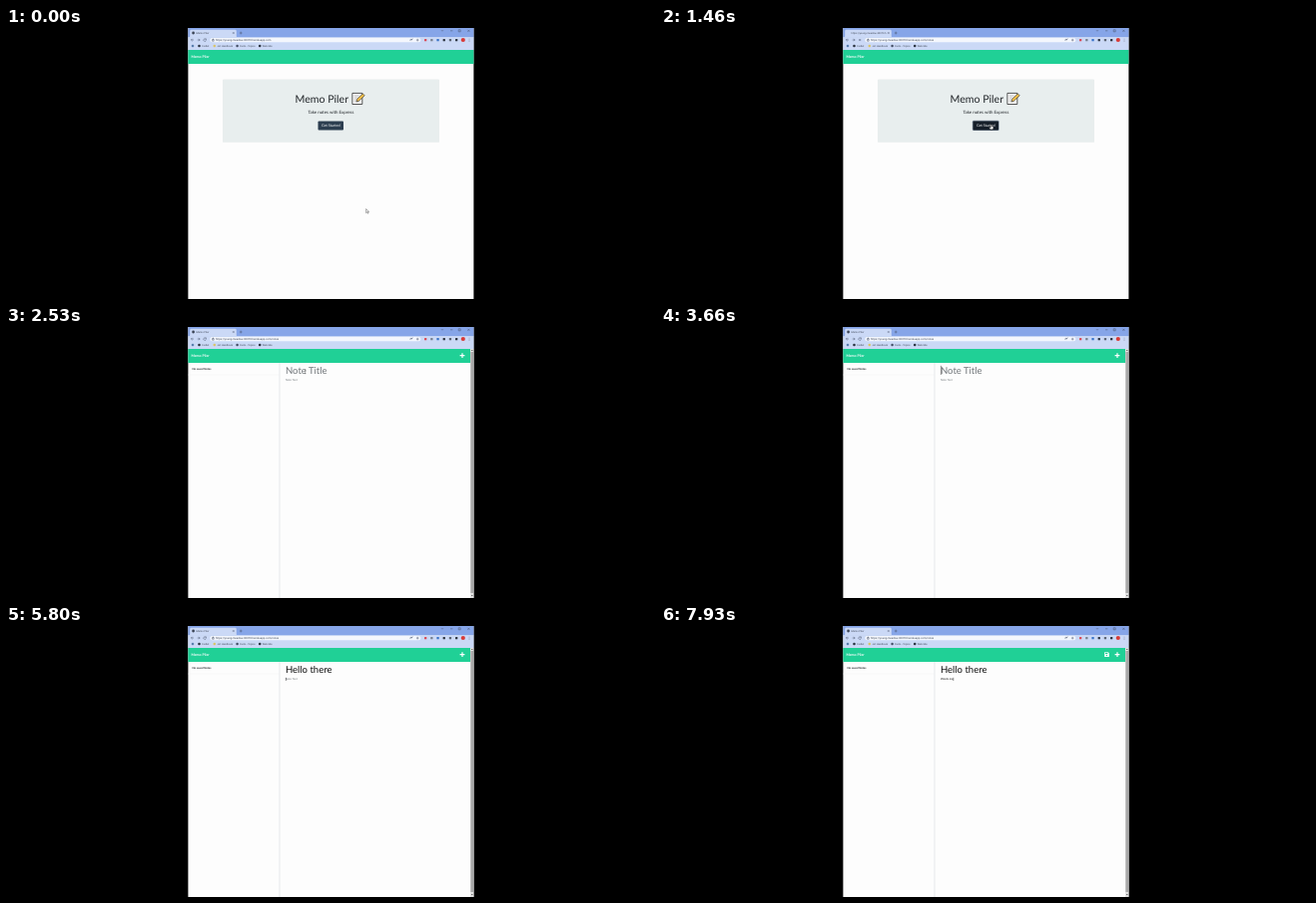
Recreate the animation shown at these times as an HTML page. Size 650 px wide and 272 px high, loop 8 s.

```html
<!DOCTYPE html>
<html lang="en">
<head>
<meta charset="utf-8">
<title>Memo Piler</title>
<style>
  html, body { margin: 0; width: 100%; height: 100%; overflow: hidden; background: #000; }
  svg { display: block; width: 100%; height: 100%; }
  text { white-space: pre; text-rendering: geometricPrecision; font-family: Lato, sans-serif; }
  .ui text { font: 2.5px Roboto, sans-serif; fill: #3c4453; }
  .ui .url { font-size: 2.72px; }
  .icon { fill: none; stroke: #465168; stroke-width: .5; }
</style>
</head>
<body>
<svg viewBox="0 0 650 272">
  <rect width="650" height="272" fill="#000"/>
  <rect x="182.4" width="286" height="272" fill="#fdfdfd"/>

  <g class="ui">
    <rect x="182.4" width="286" height="9.6" fill="#86a5e8"/>
    <rect x="182.4" y="9.2" width="286" height="12.8" fill="#cbd9f6"/>
    <path d="M183 9.4q1.2 0 1.2-1.2V3.2q0-1.4 1.4-1.4H229.4q1.4 0 1.4 1.4V8.2q0 1.2 1.2 1.2z" fill="#cbd9f6"/>
    <circle id="favicon" cx="187.6" cy="5" r="1.4" fill="#3d4656"/>
    <text id="tab" x="190.6" y="5.9"></text>
    <path class="icon" d="M227 4.2l1.6 1.6m0-1.6l-1.6 1.6M233.8 5h2.8m-1.4-1.4v2.8"/>
    <path class="icon" d="M436 2.2l1 1 1-1M445 2.8h2.4M453.2 1.8h2v2h-2zM462.4 1.8l2 2m0-2l-2 2"/>
    <path class="icon" d="M188 12H185.4m1.2-1.2l-1.2 1.2 1.2 1.2M191.6 12h2.6m-1.2-1.2l1.2 1.2-1.2 1.2"/>
    <path id="reload" class="icon"/>
    <rect x="204.4" y="9.9" width="211" height="4.4" rx="2.2" fill="#f4f7fd"/>
    <path class="icon" d="M206.6 11.7h1.6v1.5h-1.6zM207 11.6v-.6h.8v.6M405 13v-1.6h2M406 12.2l1.6-1.4M410.9 12.1h2.6m-1.3-1.3v2.6"/>
    <text id="url" class="url" x="210" y="13"></text>
    <g id="tools"></g>
    <g id="marks"></g>
  </g>

  <rect id="bar" x="182.4" y="22" height="14" fill="#20d096"/>
  <text x="185.4" y="30.1" font-size="3.55" font-weight="700" fill="#fff">Memo Piler</text>

  <g id="home">
    <rect x="217" y="51.6" width="217" height="63.2" rx=".9" fill="#e8eeee"/>
    <text x="343" y="74.7" font-size="10.6" text-anchor="end" fill="#212529">Memo Piler</text>
    <g stroke="#2b2b2b" stroke-width=".8">
      <path d="M346.9 65.4H356.8V76.5H346.9z" fill="#fff"/>
      <path d="M348.6 68h5m-5 2h3.6m-3.6 2h2.4m-2.4 2h5.6" stroke="#777" stroke-width=".5"/>
      <path d="M351 74l.8-2.9 5.6-5.2 1.8 1.9-5.5 5.2z" fill="#f3c04b" stroke-width=".6"/>
    </g>
    <text x="325.4" y="86.1" font-size="4.4" text-anchor="middle" fill="#212529">Take notes with Express</text>
    <rect id="ring" x="311.8" y="92.8" width="26.9" height="10.3" rx="1.4" fill="#8390a0"/>
    <rect id="button" x="312.5" y="93.5" width="25.5" height="9" rx=".9"/>
    <text x="325.3" y="99.2" font-size="3.7" text-anchor="middle" fill="#fff">Get Started</text>
  </g>

  <g id="notes">
    <rect x="465" y="22" width="3.4" height="250" fill="#e4e4e4"/>
    <rect x="465.4" y="25" width="2.6" height="242" fill="#aaa"/>
    <path d="M465.8 24l1-1.2 1 1.2zM465.8 269l1 1.2 1-1.2z" fill="#555"/>
    <path d="M274 36V272" stroke="#dcdfe2" stroke-width=".7"/>
    <path d="M182.4 48H274" stroke="#eceeef" stroke-width=".5"/>
    <text x="186.5" y="43" font-size="2.7" font-weight="700" fill="#212529">No saved Notes</text>
    <path d="M454.6 28.6h4.8m-2.4-2.4v4.8" stroke="#fff" stroke-width="1.2"/>
    <g id="save">
      <path d="M444.2 26.2h3.6l1 1v3.8h-4.6z" fill="#fff"/>
      <path d="M445 26.9h2.4v1.1H445z" fill="#20d096"/>
      <circle cx="446.4" cy="29.5" r=".7" fill="#20d096"/>
    </g>
    <text id="title" x="280" y="46.7" font-size="9.5"></text>
    <text id="body" x="280" y="54.4" font-size="2.75"></text>
    <path id="caret" stroke="#222" stroke-width=".5"/>
  </g>

  <g id="mouse">
    <path id="arrow" d="M0 0V4l1-.9 .7 1.5 .7-.3-.7-1.5H3z" fill="#fff" stroke="#333" stroke-width=".4"/>
    <path id="hand" d="M-.4 0h.8v1.6l1.8.5v1.7l-.6 1H-.8L-2 2.8l.5-.4 1.1.8z" fill="#fff" stroke="#222" stroke-width=".4"/>
    <path id="beam" d="M-.7 -2h1.4M-.7 2h1.4M0 -2V2" fill="none" stroke="#444" stroke-width=".35"/>
  </g>
</svg>
<script>
const LOOP = 8000, STEP = 1000 / 15, BLINK = 530;
const HOVER = 860, PRESS = 1130, LOADING = 1330, OPEN = 1530;
const FOCUS_TITLE = 2600, FOCUS_BODY = 5800, SAVE = 6400;
const HOST = 'https://young-meadow-30070.herokuapp.com';

const $ = {};
document.querySelectorAll('[id]').forEach(e => $[e.id] = e);
const set = (e, attrs) => { for (const k in attrs) e.setAttribute(k, attrs[k]); };
const show = (e, on) => e.style.display = on ? '' : 'none';
const write = (e, s) => { if (e.textContent !== s) e.textContent = s; };
const clamp = v => Math.max(0, Math.min(1, v));
const ease = v => v * v * (3 - 2 * v);

$.tools.innerHTML = ['#d94b57', '#77808f', '#3973c9', '#2b3340', '#5a6373', '#2b3340']
  .map((c, i) => `<rect x="${419 + i * 6.2}" y="10.9" width="2.3" height="2.3" rx=".5" fill="${c}"/>`)
  .join('') + '<circle cx="457.8" cy="12" r="2.1" fill="#d83a36"/>'
  + '<path d="M464 10.8v.5m0 .6v.5m0 .6v.5" stroke="#444" stroke-width=".5"/>';
$.marks.innerHTML = [[187, '', '#5b7fae'], [193.5, 'Codlet', '#2b3340'], [208.8, 'Jot Handbook', '#d9c46a'],
  [231.6, 'Facts - Topics', '#465168'], [254.2, 'Web-Site', '#2b3340']]
  .map(([x, s, c]) => `<circle cx="${x}" cy="18" r="1.3" fill="${c}"/><text x="${x + 2.6}" y="18.9">${s}</text>`)
  .join('');

const titleKeys = { text: 'Hello there', at: [4530, 4600, 4860, 4930, 5000, 5060, 5130, 5200, 5260, 5400, 5460] };
const bodyKeys = { text: 'Words me', at: [6260, 6800, 6860, 7000, 7060, 7200, 7660, 7860] };

function typed({ text, at }, t, focus) {
  const past = at.filter(k => k <= t);
  return { text: text.slice(0, past.length), last: past.length ? past[past.length - 1] : focus };
}

function field(e, state, placeholder) {
  write(e, state.text || placeholder);
  set(e, { fill: state.text ? '#0c0c0c' : '#6f7478' });
  return 280.4 + (state.text ? e.getComputedTextLength() : 0);
}

function mouse(t) {
  const q = Math.floor((t + 7) / STEP) * STEP;
  const a = ease(clamp(q / 860)), b = ease(clamp((q - 1750) / 880));
  const x = 360.6 - 30 * a - 32 * b, y = 181.6 - 84.6 * a - 54 * b;
  const over = t >= HOVER && t < OPEN, input = t >= OPEN && y < 88;
  set($.mouse, { transform: `translate(${x} ${y})` });
  show($.mouse, t < 2930);
  show($.hand, over);
  show($.beam, input);
  show($.arrow, !over && !input);
}

function draw(t) {
  const open = t >= OPEN, loading = t >= LOADING && !open;
  show($.home, !open);
  show($.notes, open);
  set($.bar, { width: open ? 282.6 : 286 });
  show($.favicon, !loading);
  write($.tab, loading ? 'https://young-meadow-30070.h' : 'Memo Piler');
  write($.url, HOST + (t >= LOADING ? '/notes' : ''));
  set($.reload, { d: loading ? 'M198.2 11l2 2m0-2l-2 2' : 'M200.2 11.3a1.3 1.3 0 1 0 .2 1.1M200.5 10.6v1h-1' });

  const dark = clamp((t - HOVER) / 150);
  const shade = (from, to) => Math.round(from + (to - from) * dark);
  set($.button, { fill: t >= PRESS ? '#151e29' : `rgb(${shade(44, 30)},${shade(62, 43)},${shade(80, 56)})` });
  show($.ring, t >= PRESS);

  const title = typed(titleKeys, t, FOCUS_TITLE), body = typed(bodyKeys, t, FOCUS_BODY);
  const titleEnd = field($.title, title, 'Note Title'), bodyEnd = field($.body, body, 'Note Text');
  const inBody = t >= FOCUS_BODY;
  const idle = t - (inBody ? body : title).last;
  set($.caret, { d: inBody ? `M${bodyEnd} 51.8V55` : `M${titleEnd} 38.8V48` });
  show($.caret, idle >= 0 && Math.floor(idle / BLINK) % 2 === 0);
  show($.save, t >= SAVE);
  mouse(t);
}

const start = performance.now();
function tick() {
  draw((performance.now() - start) % LOOP);
  requestAnimationFrame(tick);
}
tick();
</script>
</body>
</html>
```
